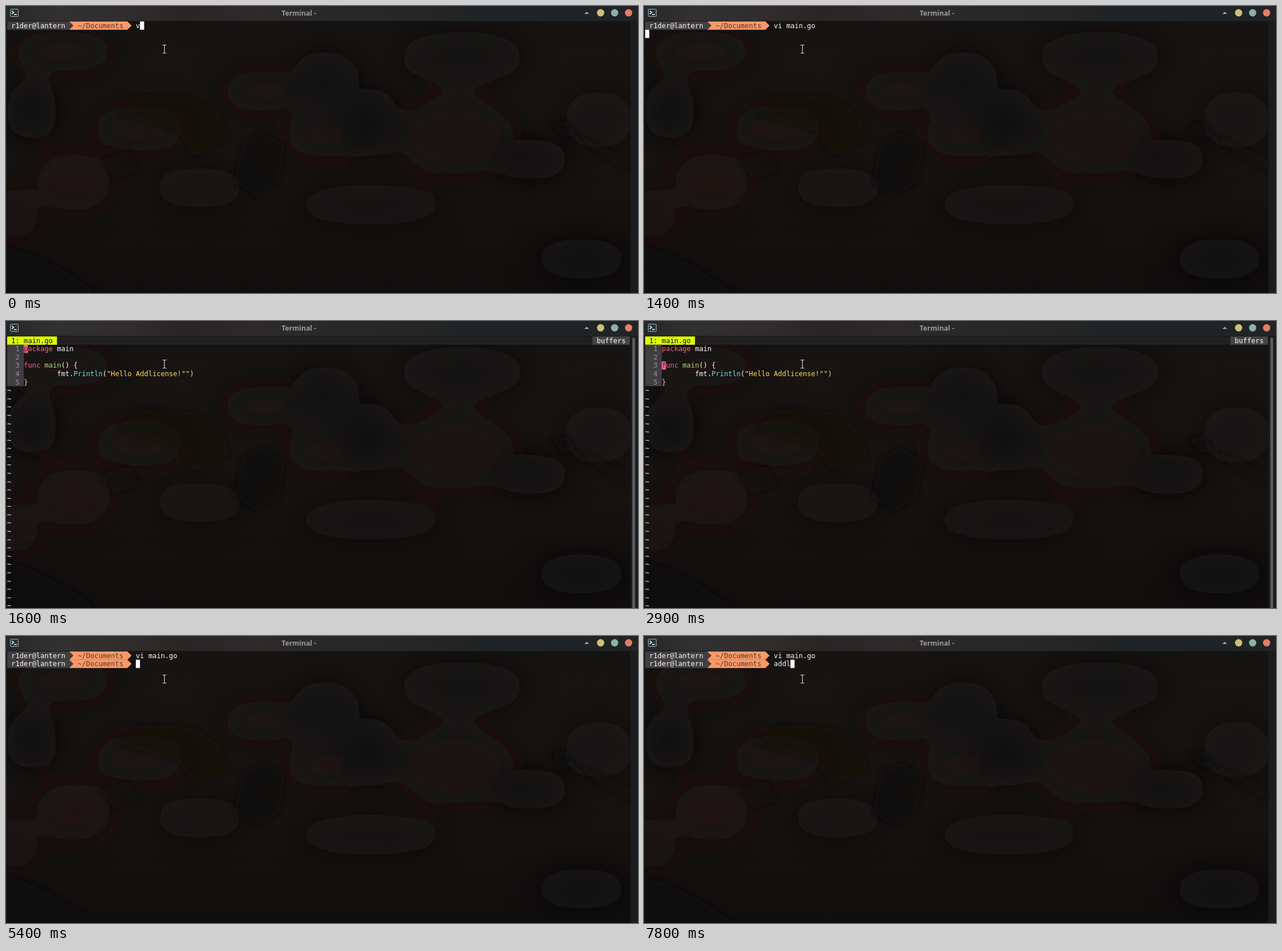
An HTML page for the animation above (8000 ms loop, 1109 by 505 pixels).

```html
<!DOCTYPE html>
<html lang="en">
<head>
<meta charset="utf-8">
<title>Terminal</title>
<style>
  html, body { margin: 0; width: 100%; height: 100%; overflow: hidden; background: #191d1f; }
  svg { display: block; width: 1109px; height: 505px; }
  text { white-space: pre; }
  #screen text { font: 12.1px "DejaVu Sans Mono", monospace; }
  .title { font: bold 12.2px "Noto Sans", sans-serif; fill: #9c9c9c; }
  .match { text-decoration: underline; }
</style>
</head>
<body>
<svg viewBox="0 0 1109 505" xmlns="http://www.w3.org/2000/svg">
  <defs>
    <linearGradient id="bar">
      <stop offset="0" stop-color="#262728"/>
      <stop offset=".08" stop-color="#323131"/>
      <stop offset=".2" stop-color="#302c2b"/>
      <stop offset=".28" stop-color="#292525"/>
      <stop offset=".4" stop-color="#2d2a29"/>
      <stop offset=".6" stop-color="#262728"/>
      <stop offset=".75" stop-color="#202325"/>
      <stop offset="1" stop-color="#212426"/>
    </linearGradient>
    <linearGradient id="sky" x2="0" y2="1">
      <stop offset="0" stop-color="#161412"/>
      <stop offset=".5" stop-color="#171311"/>
      <stop offset="1" stop-color="#100e0d"/>
    </linearGradient>
    <filter id="soft" x="-60%" y="-60%" width="220%" height="220%"><feGaussianBlur stdDeviation="26"/></filter>
    <filter id="edge" x="-30%" y="-30%" width="160%" height="160%"><feGaussianBlur stdDeviation="5"/></filter>
    <clipPath id="view"><rect x="1" y="27" width="1095" height="478"/></clipPath>
  </defs>

  <rect width="1109" height="505" fill="#191d1f"/>
  <g clip-path="url(#view)">
    <rect y="27" width="1109" height="478" fill="url(#sky)"/>
    <g id="clouds" filter="url(#soft)"></g>
    <g filter="url(#edge)" fill="#0f0c0b" opacity=".7">
      <path d="M195 190L235 155L330 160L375 190L395 235L330 265L300 220Z" opacity=".6"/>
      <path d="M415 240L450 222L490 245L480 310L440 335L400 310Z"/>
      <path d="M165 270L215 255L235 290L190 305Z" opacity=".7"/>
      <path d="M955 208L985 203L1000 228L980 232Z"/>
      <path d="M995 222L1095 268V290L1040 262Z" opacity=".7"/>
      <path d="M0 422L50 440L95 462L160 505H0Z"/>
    </g>
  </g>
  <rect y="504" width="1096" height="1" fill="#0c0c0c"/>

  <rect width="1109" height="26" fill="url(#bar)"/>
  <rect y="26" width="1109" height="1" fill="#1a1a1a"/>
  <rect x="7.5" y="5.5" width="14" height="13" rx="1" fill="#27343b" stroke="#a9b4ba"/>
  <path d="M10 8.5l3.5 2.8l-3.5 2.8M14 15h5" fill="none" stroke="#eef2f4" stroke-width="1.5"/>
  <text class="title" x="514" y="16.6" text-anchor="middle">Terminal -</text>
  <path d="M1015 14h8l-4-4z" fill="#a5a5a5"/>
  <circle cx="1043.4" cy="12" r="6.4" fill="#cbc276"/>
  <circle cx="1068" cy="12" r="6.4" fill="#8fb0a7"/>
  <circle cx="1092.5" cy="12" r="6.4" fill="#e57c6c"/>

  <g id="screen"></g>

  <g fill="none">
    <path d="M274.5 68.5h2.5l1 1l1-1h2.5M278 69v13M274.5 83h2.5l1-1l1 1h2.5" stroke="#000" stroke-width="3"/>
    <path d="M274.5 68.5h2.5l1 1l1-1h2.5M278 69v13M274.5 83h2.5l1-1l1 1h2.5" stroke="#e8e8e8" stroke-width="1.2"/>
  </g>
</svg>

<script>
const CELL = 7.285, ROW = 14.58, LEFT = 2, TOP = 27.2, LOOP = 8000;
const WHITE = '#fcfcfa', PINK = '#ff6188', GREEN = '#a9dc76', CYAN = '#78dce8',
      YELLOW = '#ffd866', ORANGE = '#fc9867', GRAY = '#403e41', DARK = '#2d2a2e';

// x, y, rx, ry, colour, opacity
const clouds = [
  [45, 185, 45, 50, '#0c1013', .9], [120, 310, 65, 50, '#25110e', .6],
  [15, 365, 40, 45, '#25100d', .6], [235, 215, 80, 40, '#201915', .6],
  [450, 150, 70, 35, '#211814', .6], [560, 230, 70, 35, '#1e1814', .6],
  [640, 205, 50, 60, '#111412', .8], [560, 130, 60, 50, '#121312', .7],
  [790, 230, 100, 65, '#201614', .6], [920, 270, 70, 35, '#0e0b0a', .8],
  [800, 90, 110, 45, '#111112', .6], [1040, 200, 60, 50, '#1b1714', .5],
  [340, 320, 80, 35, '#1c1512', .5], [640, 350, 130, 35, '#1a1310', .5],
  [1010, 445, 80, 35, '#151615', .7], [100, 80, 90, 35, '#1c1613', .6]
];
document.getElementById('clouds').innerHTML = clouds.map(([x, y, rx, ry, c, o]) =>
  `<ellipse cx="${x}" cy="${y}" rx="${rx}" ry="${ry}" fill="${c}" opacity="${o}"/>`).join('');

const px = col => LEFT + col * CELL;
const py = row => TOP + row * ROW;
const rect = (x, y, w, h, fill) => `<rect x="${x}" y="${y}" width="${w}" height="${h}" fill="${fill}"/>`;
const block = (col, row, cols, fill, rows = 1) => rect(px(col), py(row), cols * CELL, rows * ROW, fill);
const print = (col, row, str, fill, cls = '') =>
  `<text class="${cls}" x="${px(col)}" y="${py(row) + 11.5}" fill="${fill}">${str}</text>`;
const arrow = (col, row, fill) =>
  `<path d="M${px(col) - .2} ${py(row)}l${CELL} ${ROW / 2}l${-CELL} ${ROW / 2}z" fill="${fill}"/>`;
const cursor = (col, row, fill = WHITE, ch = '') => block(col, row, 1, fill) + print(col, row, ch, DARK);

const prompt = (row, cmd) =>
  block(15, row, 14, ORANGE) + block(0, row, 15, GRAY) +
  arrow(15, row, GRAY) + arrow(29, row, ORANGE) +
  print(1, row, 'r1der@lantern', WHITE) + print(17, row, '~/Documents', GRAY) +
  print(31, row, cmd, WHITE);

const typing = (row, cmd) => prompt(row, cmd) + cursor(31 + cmd.length, row);
const opened = prompt(0, 'vi main.go');
const waiting = opened + cursor(0, 1);
const second = cmd => opened + typing(1, cmd);

const thumb = '<rect x="1099" y="29" width="5" height="490" rx="2.5" fill="#58595a"/>';
const blank = rect(1, 27, 1095, 478, '#171718') + rect(2, 28, 1093, 476, '#2d2b2e') + thumb;

function editor(cur, matched) {
  const brace = matched ? PINK : WHITE, cls = matched ? 'match' : '';
  let out = block(0, 0, 150, '#202020') + block(0, 0, 12, '#dfff00') + block(141, 0, 9, '#444444') +
    print(1, 0, '1: main.go', '#00005f') + print(142, 0, 'buffers', WHITE) +
    block(0, 1, 4, GRAY, 5);
  for (let n = 1; n <= 5; n++) out += print(2, n, n, '#949294');
  for (let r = 6; r < 33; r++) out += print(0, r, '~', WHITE);
  out += print(4, 1, 'package', PINK) + print(12, 1, 'main', WHITE) +
    print(4, 3, 'func', PINK) + print(9, 3, 'main', GREEN) + print(13, 3, '()', WHITE) +
    print(16, 3, '{', brace, cls) +
    print(12, 4, 'fmt.', WHITE) + print(16, 4, 'Println', CYAN) + print(23, 4, '(', WHITE) +
    print(24, 4, '"Hello Addlicense!"")', YELLOW) +
    print(4, 5, '}', matched ? PINK : YELLOW, cls);
  return out + cur + thumb;
}

const steps = [
  [0, typing(0, 'v')],
  [200, typing(0, 'vi')],
  [300, typing(0, 'vi ')],
  [600, typing(0, 'vi m')],
  [800, typing(0, 'vi ma')],
  [1100, typing(0, 'vi main.go ')],
  [1400, waiting],
  [1500, blank],
  [1600, editor(cursor(4, 1, PINK, 'p'), false)],
  [2900, editor(cursor(4, 3, PINK, 'f'), false)],
  [3300, editor(cursor(11, 4), false)],
  [3400, editor(cursor(4, 5, PINK, '}'), true)],
  [4500, editor('', true)],
  [5300, waiting],
  [5400, second('')],
  [7300, second('a')],
  [7500, second('ad')],
  [7700, second('add')],
  [7800, second('addl')]
];

const screenEl = document.getElementById('screen');
let shown = null;
function draw(now) {
  const t = now % LOOP;
  const step = steps.findLast(s => s[0] <= t);
  if (step !== shown) {
    screenEl.innerHTML = step[1];
    shown = step;
  }
}
const start = performance.now();
function tick() {
  draw(performance.now() - start);
  requestAnimationFrame(tick);
}
tick();
</script>
</body>
</html>
```
